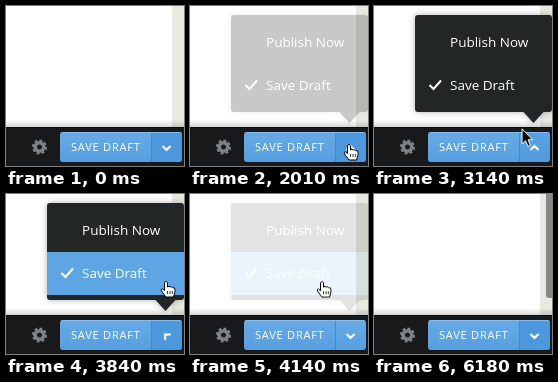
Recreate the animation shown at these times as an HTML page. Size 178 by 160 pixels, loop 6.28 s.

```html
<!DOCTYPE html>
<html lang="en">
<head>
<meta charset="utf-8">
<title>Save menu</title>
<style>
html, body { margin: 0; width: 100%; height: 100%; overflow: hidden; background: #fff; }
svg { display: block; width: 178px; height: 160px; }
text { font-family: "Open Sans", sans-serif; fill: #fff; }
.item { font-size: 13.5px; }
.label { font-size: 11px; letter-spacing: .8px; }
.line { fill: none; stroke: #fff; stroke-width: 2; }
#menu, #row, #bar, #hand, #arrow, #mainHover, #mainPress { opacity: 0; }
</style>
</head>
<body>
<svg viewBox="0 0 178 160">
  <defs>
    <linearGradient id="shade" x2="0" y2="1">
      <stop offset="0" stop-color="#000" stop-opacity="0"/>
      <stop offset="1" stop-color="#000" stop-opacity=".16"/>
    </linearGradient>
    <linearGradient id="blue" x2="0" y2="1">
      <stop offset="0" stop-color="#67aae6"/>
      <stop offset="1" stop-color="#569fe0"/>
    </linearGradient>
    <filter id="soft" x="-10%" y="-10%" width="120%" height="120%">
      <feDropShadow dx="0" dy="0" stdDeviation="3" flood-opacity=".3"/>
    </filter>
    <clipPath id="round"><rect x="54" y="126" width="122" height="30" rx="3"/></clipPath>
  </defs>

  <rect width="178" height="160" fill="#fff"/>
  <rect x="166" width="12" height="122" fill="#e9e8e1"/>
  <rect id="bar" x="172" y="-8" width="8" height="112" rx="3" fill="#6f6f6e"/>
  <rect y="114" width="178" height="7" fill="url(#shade)"/>
  <rect y="121" width="178" height="39" fill="#18191b"/>
  <rect y="121" width="178" height="1" fill="#0b0c0d"/>

  <g fill="none" stroke="#7d8488" transform="translate(33.5 141)">
    <circle r="4.3" stroke-width="3.6"/>
    <circle r="6.6" stroke-width="2" pathLength="16" stroke-dasharray="1.1 .9"/>
  </g>

  <g clip-path="url(#round)">
    <rect x="54" y="126" width="122" height="30" fill="url(#blue)"/>
    <rect id="mainHover" x="54" y="126" width="91" height="30" fill="#4d97dc"/>
    <rect id="mainPress" x="54" y="126" width="91" height="30" fill="#428cd5"/>
    <rect id="dropHover" x="145" y="126" width="31" height="30" fill="#4d97dc"/>
    <rect x="145" y="126" width="1" height="30" fill="#438bd0"/>
    <rect x="54" y="126" width="122" height="1" fill="#80baee"/>
  </g>
  <text class="label" x="65" y="145">SAVE DRAFT</text>
  <g transform="translate(160.5 142)"><path id="chevron" class="line" d="M-4-2L0 2L4-2"/></g>

  <g id="menu">
    <path filter="url(#soft)" fill="#242628" d="M44 9H175Q178 9 178 12V103Q178 106 175 106H169.500L159.500 117L149.500 106H44Q41 106 41 103V12Q41 9 44 9Z"/>
    <rect id="row" x="41" y="58" width="137" height="43" fill="#5ea5e4"/>
    <text class="item" x="76" y="41">Publish Now</text>
    <text class="item" x="76" y="84">Save Draft</text>
    <path class="line" stroke-width="2.500" d="M55.500 79L59.500 83L67 74.500"/>
  </g>

  <g id="cursor">
    <path id="arrow" fill="#000" stroke="#fff" d="M0 0V15L3.500 11.800L6 17.500L8.400 16.500L6 10.800H10.500Z"/>
    <g id="hand" stroke="#000" stroke-linejoin="round">
      <path fill="#fff" d="M-1.500 1.500Q0-.8 1.500 1.500V6Q3 4.500 4.200 6Q5.700 5.200 6.600 6.600Q9 6.200 9 8.500V11L7.500 16H0L-4.500 10Q-5.500 8-3.500 7.800L-1.500 9.500Z"/>
      <path fill="none" stroke-width=".8" d="M1.500 10V13M4 10V13M6.300 10V13"/>
    </g>
  </g>
</svg>
<script>
const LOOP = 6280;

// Steps are [time in ms, value]; the last value holds until the loop ends.
function play(id, prop, steps, easing = 'linear') {
  const list = [...steps, [LOOP, steps[steps.length - 1][1]]];
  const frames = list.map(([t, v]) => ({ offset: t / LOOP, [prop]: String(v), easing }));
  const anim = document.getElementById(id).animate(frames, { duration: LOOP, iterations: Infinity });
  anim.startTime = 0 + start;
}
const start = document.timeline.currentTime || 0;
const jump = (id, prop, steps) => play(id, prop, steps, 'step-end');
const at = (t, x, y) => [t, `translate(${x}px, ${y}px)`];
const turn = (t, deg) => [t, `rotate(${deg}deg)`];

play('cursor', 'transform', [
  at(0, -20, 100), at(960, -20, 100), at(1010, -6, 100), at(1240, 72, 104),
  at(1420, 132, 122), at(1590, 159, 138), at(3085, 159, 138), at(3140, 148, 123),
  at(3280, 154, 100), at(3420, 160, 87), at(3840, 160, 87), at(4140, 132, 87),
  at(4260, 126, 104), at(4440, 118, 138), at(4560, 115, 143), at(5275, 115, 143),
  at(5500, 143, 139), at(5840, 190, 124)
]);
jump('arrow', 'opacity', [
  [0, 0], [1010, 1], [1480, 0], [3140, 1], [3250, 0], [4220, 1], [4400, 0], [5650, 1], [5840, 0]
]);
jump('hand', 'opacity', [
  [0, 0], [1480, 1], [3140, 0], [3250, 1], [4220, 0], [4400, 1], [5650, 0]
]);

play('chevron', 'transform', [
  turn(0, 0), turn(1600, 0), turn(1770, 180), turn(3790, 180), turn(3840, 135), turn(3960, 0)
]);
play('menu', 'opacity', [
  [0, 0], [1955, 0], [2010, .25], [2180, 1], [3890, 1], [4140, .13], [4220, 0]
]);
jump('row', 'opacity', [[0, 0], [3250, 1], [4300, 0]]);

jump('dropHover', 'opacity', [
  [0, 1], [840, 0], [1480, 1], [3140, .5], [3660, 1], [4000, 0], [5500, 1]
]);
jump('mainHover', 'opacity', [[0, 0], [4400, 1], [6010, 0]]);
jump('mainPress', 'opacity', [[0, 0], [4910, 1], [5030, 0]]);

jump('bar', 'opacity', [[0, 0], [5660, 1], [6180, .8]]);
</script>
</body>
</html>
```
